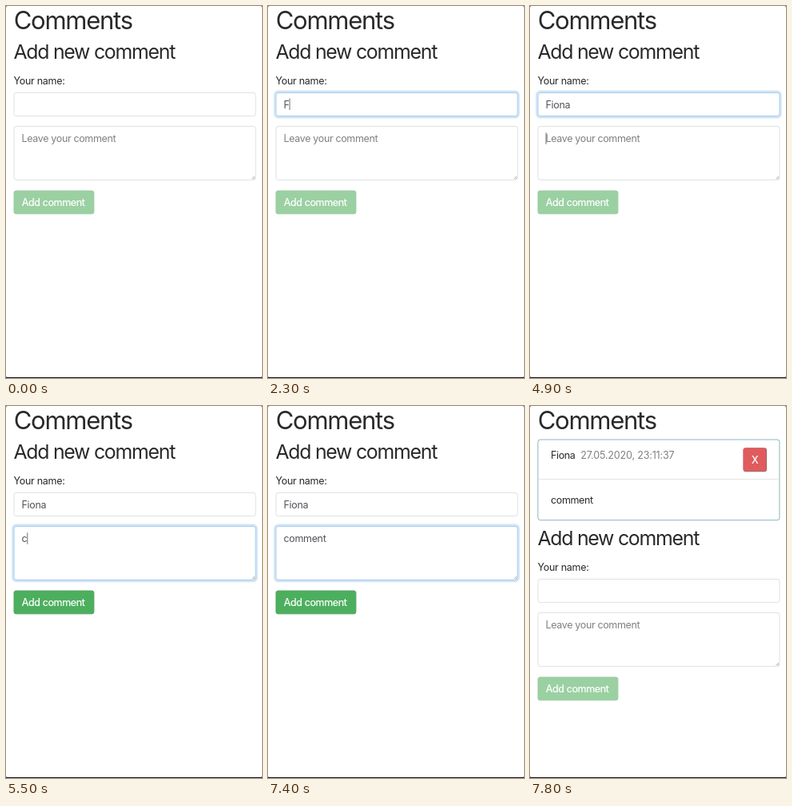
Animation of 320 by 465 pixels, one loop 8000 ms. Source, as an HTML page:

```html
<!DOCTYPE html>
<html lang="en">
<head>
<meta charset="utf-8">
<title>Comments</title>
<style>
  html, body { margin: 0; width: 100%; height: 100%; overflow: hidden; background: #fff; }
  svg { display: block; width: 320px; height: 465px; }
  text {
    font-family: Inter, Roboto, "Liberation Sans", sans-serif;
    font-size: 12.5px;
    font-optical-sizing: none;
    letter-spacing: -.36px;
    fill: #28292b;
    white-space: pre;
  }
  .h1 { font-size: 31px; letter-spacing: -1.25px; }
  .h2 { font-size: 24.8px; letter-spacing: -1.23px; }
  .label { letter-spacing: -.3px; }
  .value { fill: #50555a; }
  .hint, .date { fill: #7d8185; }
  .date { letter-spacing: -.16px; }
  .light { fill: #fff; stroke: #fff; stroke-width: .22; }
  .field { fill: #fff; }
  .ring { fill: none; stroke: #d2e5f7; stroke-width: 2.4; }
  .caret { fill: #5c6064; }
  .grip { stroke: #8b8b8b; stroke-width: .8; }
</style>
</head>
<body>
<svg viewBox="0 0 320 465">
  <rect width="320" height="465" fill="#17151a"/>
  <rect width="320" height="464" rx="1.5" fill="#fff"/>
  <text class="h1" x="9.7" y="28.9">Comments</text>

  <g id="card">
    <rect x="9.9" y="42" width="302" height="100.7" rx="3" fill="#fff" stroke="#8fb5bb"/>
    <path d="M10.4 91.5H311.4" stroke="#e3e5e6"/>
    <text x="26" y="66.3">Fiona</text>
    <text class="date" x="63.3" y="66.3">27.05.2020, 23:11:37</text>
    <rect x="266.5" y="52.3" width="29.6" height="29.9" rx="3.2" fill="#a8686a"/>
    <rect x="266.6" y="52.4" width="28.2" height="28.6" rx="2.8" fill="#e05b5d"/>
    <text class="light" x="281" y="72.1" text-anchor="middle">X</text>
    <text x="26" y="122">comment</text>
  </g>

  <g id="form">
    <text class="h2" x="9.4" y="66.4">Add new comment</text>
    <text class="label" x="9.6" y="97.5">Your name:</text>
    <g id="name">
      <rect class="ring" x="8.4" y="106.8" width="305" height="32.4" rx="4.2"/>
      <rect class="field" x="10" y="108.4" width="302" height="29.2" rx="3"/>
      <text class="value" x="19.6" y="127.5"></text>
      <rect class="caret" y="115.5" width=".9" height="14.5"/>
    </g>
    <g id="note">
      <rect class="ring" x="8.4" y="148.8" width="305" height="70.2" rx="4.2"/>
      <rect class="field" x="10" y="150.4" width="302" height="67" rx="3"/>
      <path class="grip" d="M307.5 216.2l3.4-3.4M309.7 216.4l1.4-1.4"/>
      <text class="hint" x="19.6" y="170">Leave your comment</text>
      <text class="value" x="19.6" y="170"></text>
      <rect class="caret" y="158.3" width=".9" height="14.5"/>
    </g>
    <rect id="button" x="10" y="231" width="99.9" height="28.8" rx="2.6"/>
    <text class="light" x="19.7" y="250">Add comment</text>
  </g>
</svg>
<script>
const LOOP = 8000, SENT = 7700;
const $ = s => document.querySelector(s);

// [time, typed text, caret visible]
const nameKeys = [
  [0, "", 0], [1300, "", 1], [1800, "", 0], [2300, "F", 1], [2500, "Fo", 1],
  [2900, "F", 1], [3200, "Fi", 1], [3700, "Fio", 1], [4000, "Fion", 1],
  [4100, "Fiona", 1], [4600, "Fiona", 0], [SENT, "", 0]
];
const noteKeys = [
  [0, "", 0], [4900, "", 1], [5400, "c", 1], [5700, "co", 1], [6000, "com", 1],
  [6100, "comm", 1], [6300, "comme", 1], [6400, "commen", 1],
  [6900, "comment", 1], [7400, "comment", 0], [SENT, "", 0]
];

function ramp(t, start, length = 140) {
  const p = Math.min(1, Math.max(0, (t - start) / length));
  return p * p * (3 - 2 * p);
}

function mix(a, b, p) {
  return `rgb(${a.map((v, i) => Math.round(v + (b[i] - v) * p))})`;
}

function drawField(id, keys, t, focus) {
  const [, typed, caretOn] = keys.findLast(k => k[0] <= t);
  const box = $(id);
  const value = box.querySelector(".value");
  const caret = box.querySelector(".caret");
  value.textContent = typed;
  const width = typed ? value.getComputedTextLength() : 0;
  caret.setAttribute("x", 19.6 + width);
  caret.style.opacity = caretOn;
  box.querySelector(".ring").style.opacity = focus;
  box.querySelector(".field").style.stroke = mix([222, 224, 227], [160, 200, 237], focus);
  return typed;
}

function draw(t) {
  const sent = t >= SENT;
  $("#card").style.display = sent ? "" : "none";
  $("#form").setAttribute("transform", `translate(0 ${sent ? 108 : 0})`);

  drawField("#name", nameKeys, t, ramp(t, 1250) - ramp(t, 4900, 180));
  const note = drawField("#note", noteKeys, t, ramp(t, 4900, 180) - ramp(t, 7650));
  $("#note .hint").style.display = note ? "none" : "";

  const active = ramp(t, 5350) - ramp(t, 7650);
  $("#button").style.fill = mix([155, 208, 162], [76, 175, 94], active);
  $("#button").style.stroke = mix([155, 205, 162], [84, 164, 98], active);
}

function tick(now) {
  draw(now % LOOP);
  requestAnimationFrame(tick);
}

draw(0);
requestAnimationFrame(tick);
</script>
</body>
</html>
```
